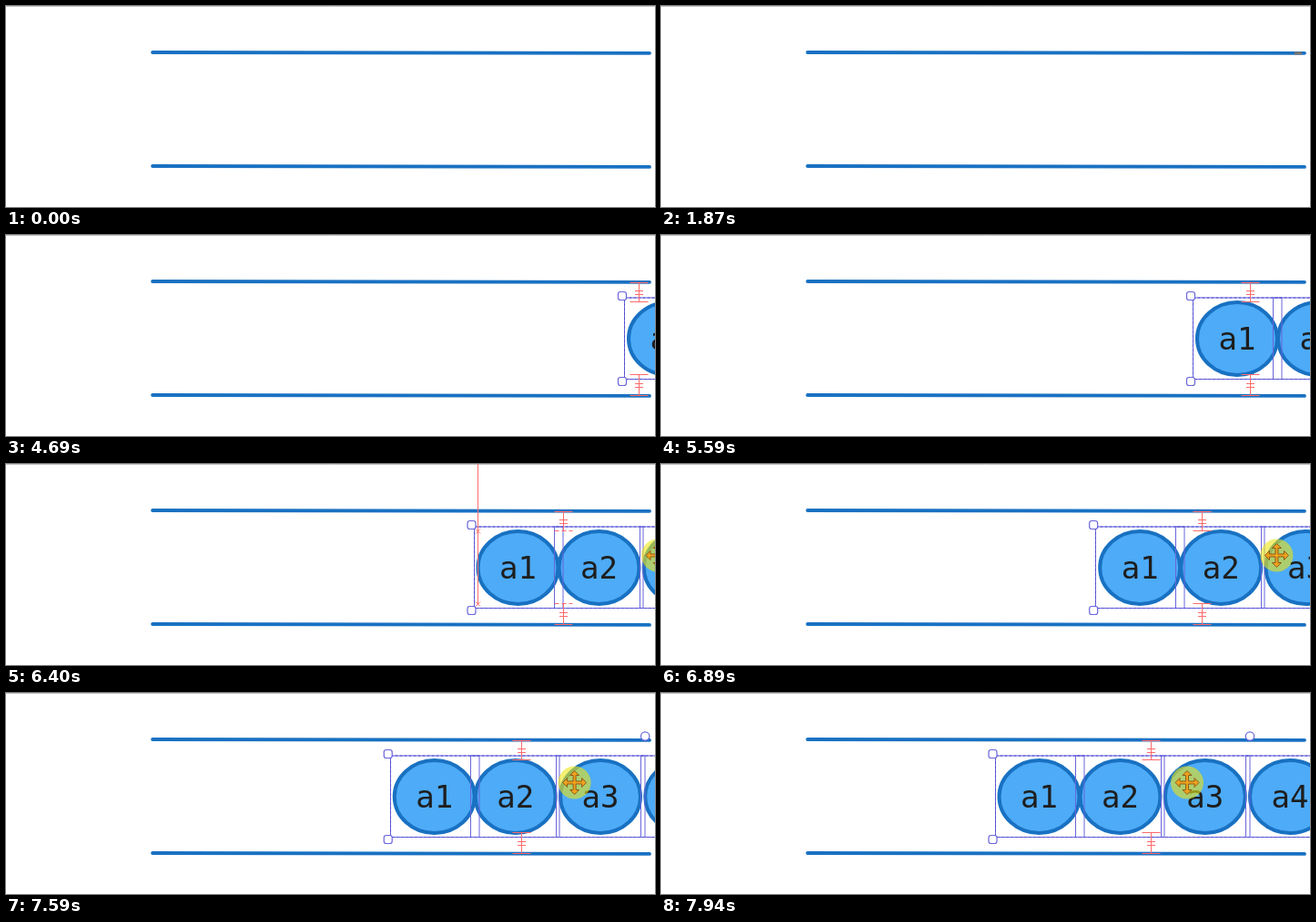
These frames come from a looping animation (713x221 px, 8 s). An HTML page with a canvas:

```html
<!DOCTYPE html>
<html lang="en">
<head>
<meta charset="utf-8">
<title>Sliding group</title>
<style>
html, body { margin: 0; width: 100%; height: 100%; overflow: hidden; background: #fff; }
canvas { display: block; }
</style>
</head>
<body>
<canvas width="713" height="221"></canvas>
<script>
const ctx = document.querySelector('canvas').getContext('2d');
const W = 713, H = 221, LOOP = 8000;
const DRAG_START = 4690, STEP = 67.1;
const BLUE = '#1971c2', PURPLE = '#6965db', RED = '#ff6b6b';

// [step, x of the group's left handle]
const groupKeys = [[-5, 704], [-3, 699], [-1, 699], [0, 677], [11, 610], [12, 610], [13, 582],
  [15, 582], [20, 542], [21, 542], [25, 511.5], [33, 470], [39, 454], [46, 394], [48, 364.5]];
// [step, pointer distance from that handle]
const pointerKeys = [[25, 204.5], [39, 198], [48, 213.5]];

function valueAt(keys, s) {
  if (s <= keys[0][0]) return keys[0][1];
  for (let i = 1; i < keys.length; i++) {
    const [s0, v0] = keys[i - 1], [s1, v1] = keys[i];
    if (s <= s1) return v0 + (v1 - v0) * (s - s0) / (s1 - s0);
  }
  return keys[keys.length - 1][1];
}

function line(x1, y1, x2, y2, color, width = 1, dash = []) {
  ctx.strokeStyle = color;
  ctx.lineWidth = width;
  ctx.setLineDash(dash);
  ctx.beginPath();
  ctx.moveTo(x1, y1);
  ctx.lineTo(x2, y2);
  ctx.stroke();
  ctx.setLineDash([]);
}

function shape(build, fill, stroke, width) {
  ctx.beginPath();
  build();
  ctx.fillStyle = fill;
  ctx.fill();
  if (stroke) {
    ctx.strokeStyle = stroke;
    ctx.lineWidth = width;
    ctx.stroke();
  }
}

function rails() {
  ctx.lineCap = 'round';
  line(161, 51, 707, 51.8, BLUE, 3.8);
  line(161, 176, 707, 176.9, BLUE, 3.8);
  ctx.lineCap = 'butt';
}

function node(x, label) {
  shape(() => ctx.ellipse(x, 114, 44, 40, 0, 0, 7), '#4dabf7', BLUE, 4);
  ctx.fillStyle = '#1e1e1e';
  ctx.fillText(label, x, 126);
}

function selection(h) {
  const left = Math.round(h + 2) + .5;
  ctx.strokeStyle = PURPLE;
  ctx.lineWidth = 1;
  for (const offset of [2.5, 90.5, 184.5, 278]) {
    ctx.strokeRect(Math.round(h + offset - .5) + .5, 69, 97.5, 89.5);
  }
  ctx.setLineDash([3, 2]);
  ctx.strokeStyle = '#4f4bd0';
  ctx.strokeRect(left, 69, 560, 89.5);
  ctx.setLineDash([]);
  for (const y of [67, 161]) {
    shape(() => ctx.roundRect(h - 4.5, y - 4.5, 9, 9, 2.5), '#fff', PURPLE, 1.2);
  }
  shape(() => ctx.arc(h + 282.5, 47.5, 4.7, 0, 7), '#fff', PURPLE, 1.2);
}

function gapGuide(x, top, bottom, tick, dashedY) {
  line(x, top, x, bottom, RED);
  for (const y of [top, bottom]) line(x - 10, y, x + 10, y, RED, 1, y === dashedY ? [5, 3] : []);
  for (const y of [tick, tick + 4]) line(x - 4.5, y, x + 4.5, y, RED);
}

function snapGuide(x) {
  line(x, 0, x, 155, RED);
  for (const y of [74, 154]) {
    line(x - 2.5, y - 2.5, x + 2.5, y + 2.5, RED);
    line(x - 2.5, y + 2.5, x + 2.5, y - 2.5, RED);
  }
}

function pointer(x, y) {
  shape(() => ctx.arc(x, y, 18, 0, 7), 'rgba(235,230,20,.6)');
  ctx.save();
  ctx.translate(x, y);
  shape(() => {
    for (let i = 0; i < 4; i++) {
      const c = Math.cos(i * Math.PI / 2), s = Math.sin(i * Math.PI / 2);
      for (const [a, b] of [[1.5, -1.5], [8, -1.5], [8, -5], [13, 0], [8, 5], [8, 1.5]]) {
        ctx.lineTo(a * c - b * s, a * s + b * c);
      }
    }
    ctx.closePath();
  }, '#eda21f', '#8f5a14', 1);
  ctx.restore();
}

function draw(t) {
  ctx.fillStyle = '#fff';
  ctx.fillRect(0, 0, W, H);
  line(0, .5, W, .5, '#c6c6c6');
  rails();
  if (t >= 1870 && t < 3480) line(696, 52, 704, 52, '#7d746c', 3);

  const step = Math.floor((t - DRAG_START) / STEP);
  if (step >= -5) {
    const h = valueAt(groupKeys, step);
    const snapped = step === 25;
    [51, 140, 233.3, 326.5].forEach((offset, i) => node(h + offset, 'a' + (i + 1)));
    selection(h);
    const mid = Math.floor((h + W) / 2) + .5;
    gapGuide(mid, 52.5, 73.5, 61.5, snapped && 73.5);
    gapGuide(mid, 176.5, 153.5, 163.5, snapped && 153.5);
    if (snapped) snapGuide(518.5);
    pointer(h + valueAt(pointerKeys, step), step < 39 ? 100.5 : 98.5);
  }
}

ctx.font = '34px "DejaVu Sans Mono", monospace';
ctx.textAlign = 'center';

function tick() {
  draw(performance.now() % LOOP);
  requestAnimationFrame(tick);
}
tick();
</script>
</body>
</html>
```
